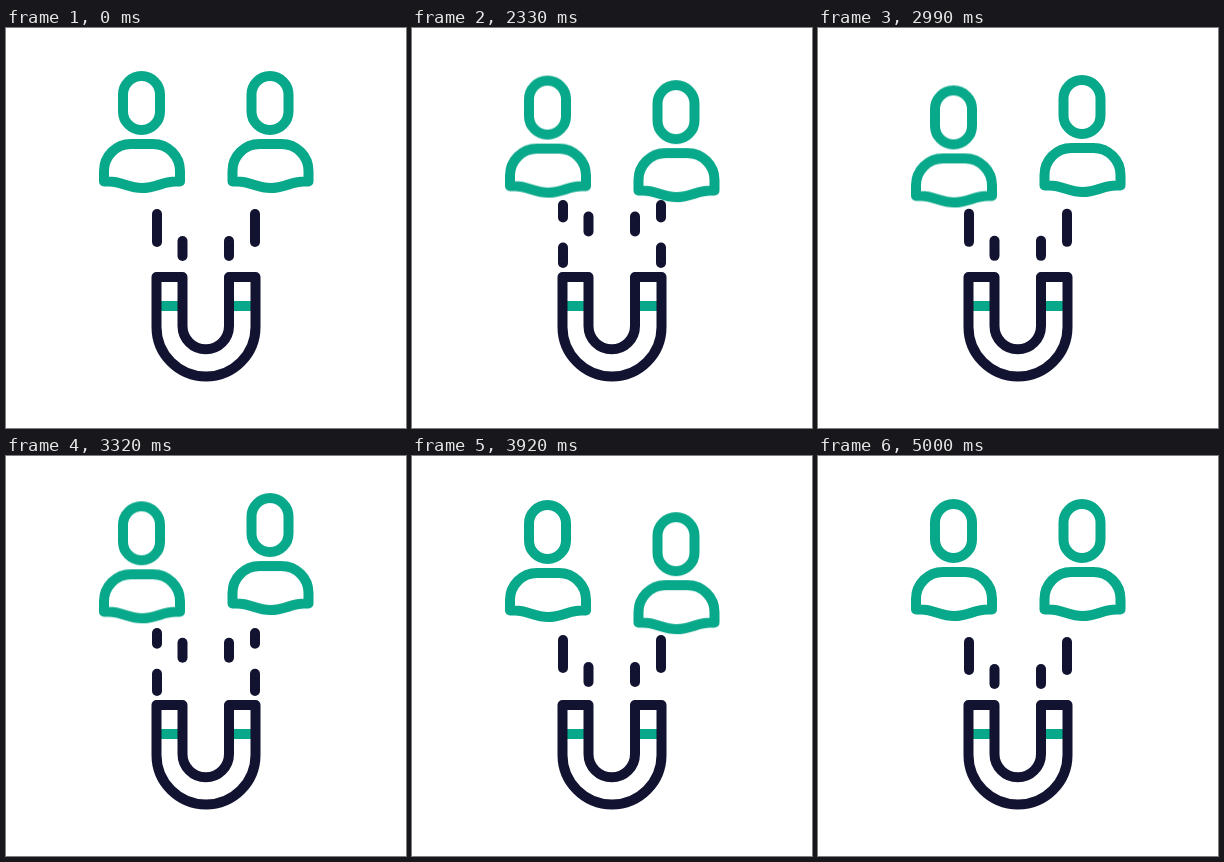
Animation of 400 by 400 pixels, one loop 5.12 s. Source, as an HTML page:

```html
<!DOCTYPE html>
<html lang="en">
<head>
<meta charset="utf-8">
<title>Magnet attracting people</title>
<style>
  html, body { margin: 0; width: 100%; height: 100%; overflow: hidden; background: #fff; }
  svg { display: block; width: 100vw; height: 100vh; }
  svg { fill: none; stroke-width: 10; stroke-linecap: round; stroke-linejoin: round; }
  .green { stroke: #08a88a; }
  .navy { stroke: #121331; }

  .left, .right, .dash { animation: 5120ms infinite; }
  .left, .right { animation-timing-function: cubic-bezier(.37, 0, .63, 1); }
  .left { animation-name: left; }
  .right { animation-name: right; }

  /* each dash wraps around a 58px line; --s is its resting place */
  .dash {
    stroke-dashoffset: var(--s);
    animation-name: flow;
    animation-timing-function: cubic-bezier(.38, .08, .55, .95);
  }
  .long { --s: -9px; stroke-dasharray: 28px 30px; }
  .short { --s: -36px; stroke-dasharray: 15px 43px; }

  @keyframes left {
    0%, 39.26% { transform: translateY(0); }
    56.25% { transform: translateY(15.5px); }
    71.29% { transform: translateY(-6px); }
    84.96% { transform: translateY(15.5px); }
    97.66%, 100% { transform: translateY(0); }
  }
  @keyframes right {
    0%, 39.26% { transform: translateY(0); }
    50.78% { transform: translateY(16px); }
    65.23% { transform: translateY(-6px); }
    80.08% { transform: translateY(16px); }
    97.07%, 100% { transform: translateY(0); }
  }
  @keyframes flow {
    0%, 39.06% { stroke-dashoffset: var(--s); }
    58.59% { stroke-dashoffset: calc(var(--s) - 116px); }
    78.13% { stroke-dashoffset: calc(var(--s) - 232px); }
    97.66%, 100% { stroke-dashoffset: calc(var(--s) - 348px); }
  }
</style>
</head>
<body>
<svg viewBox="0 0 400 400">
  <defs>
    <g id="person">
      <rect x="117" y="48" width="37" height="54" rx="18.5"/>
      <path d="M98 153.5V143a27 27 0 0 1 27-27h22a27 27 0 0 1 27 27v10.500h-4.500c-12 0-20 6.500-33.500 6.500s-20-6.500-33-6.500z"/>
    </g>
  </defs>

  <g class="navy">
    <path class="dash long" d="M151 177v58"/>
    <path class="dash long" d="M249 177v58"/>
    <path class="dash short" d="M176.500 177v58"/>
    <path class="dash short" d="M223 177v58"/>
  </g>

  <path class="green" stroke-linecap="butt" d="M152 278h22M225 278h22"/>
  <path class="navy" d="M150.500 249H176.500V298a23.250 23.250 0 0 0 46.500 0V249H249.500V299a49.500 49.500 0 0 1-99 0z"/>

  <g class="green">
    <g class="left"><use href="#person"/></g>
    <g class="right"><use href="#person" x="128.500"/></g>
  </g>
</svg>
</body>
</html>
```
